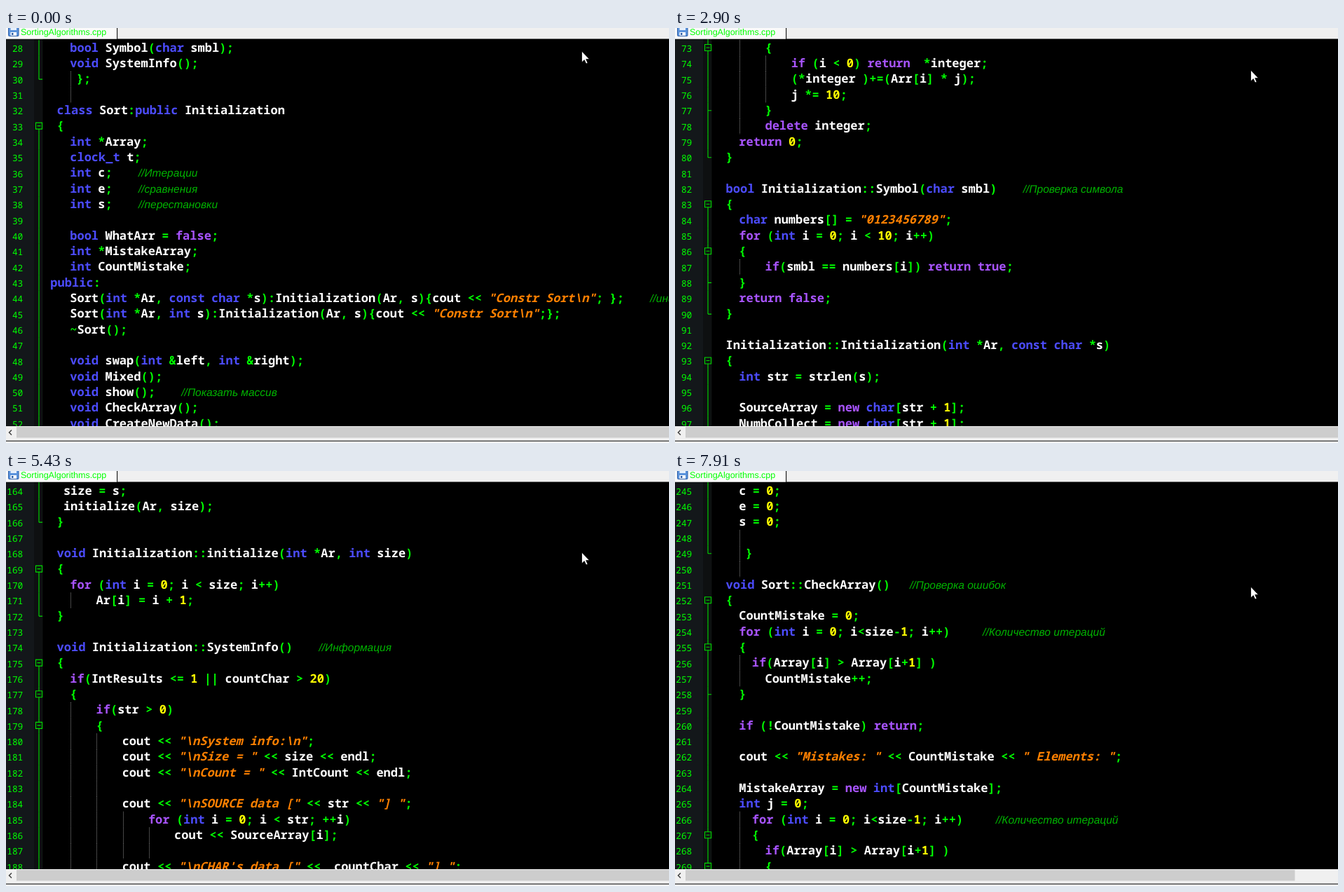
Animation, 946 px wide and 592 px high, one loop 8000 ms. Source, as an HTML page:

```html
<!DOCTYPE html>
<html lang="en">
<head>
<meta charset="utf-8">
<title>Scrolling code</title>
<style>
html, body { margin: 0; width: 100%; height: 100%; overflow: hidden; background: #000; }
svg { display: block; width: 946px; height: 592px; }
text { white-space: pre; text-rendering: geometricPrecision; }
.code text { font: bold 17.05px "Noto Sans Mono", "DejaVu Sans Mono", monospace; fill: #fff; }
.code .type { fill: #4c4cff; }
.code .flow { fill: #a854ff; }
.code .op { fill: #0f0; }
.code .num { fill: #ff0; }
.code .str { fill: #ff8000; font-style: italic; }
.code .chr { fill: #ff0080; font-style: italic; }
.code .note { fill: #00b400; font: italic 15.5px "Liberation Sans", Arial, sans-serif; }
.code .line { fill: #0f0; font: 12.8px "Noto Sans Mono", "DejaVu Sans Mono", monospace; text-anchor: end; }
.guide { stroke: #8a8a8a; stroke-dasharray: 1 1; }
.fold { stroke: #00dc00; stroke-width: 1.1; fill: none; }
.tab { font: 12.5px "Liberation Sans", Arial, sans-serif; fill: #0f0; }
</style>
</head>
<body>
<svg viewBox="0 0 946 592">
  <defs><clipPath id="view"><rect y="16" width="946" height="552"/></clipPath></defs>
  <rect width="946" height="592"/>
  <rect width="40" height="592" fill="#13171a"/>
  <rect x="40" width="12.5" height="592" fill="#0e1011"/>
  <g clip-path="url(#view)"><g class="code" id="code"></g></g>

  <rect width="946" height="15.5" fill="#f0f0f0"/>
  <rect width="158" height="15.5" fill="#fafafa"/>
  <rect x="158" width="1.2" height="16" fill="#222"/>
  <rect x="3.5" y="-3" width="14.5" height="14.5" rx="1" fill="#5b93dc" stroke="#2f5fa8"/>
  <rect x="6.5" y="-3" width="8.5" height="6" fill="#e6f0fc"/>
  <rect x="6.5" y="6" width="8.5" height="5" fill="#fff"/>
  <rect x="8" y="7" width="2.5" height="3" fill="#2f5fa8"/>
  <text class="tab" x="21" y="10">SortingAlgorithms.cpp</text>

  <rect y="568" width="946" height="24" fill="#f0f0f0"/>
  <rect id="thumb" x="15" y="569" width="931" height="15.5" fill="#cdcdcd"/>
  <path d="M8 573.5L4.5 577L8 580.5" fill="none" stroke="#404040" stroke-width="1.5"/>
  <rect y="588.5" width="946" height="1.3" fill="#3a3a3a"/>
  <path id="cursor" d="M0 0V16L3.7 12.6L6.2 18L8.6 17L6.2 11.6H11Z" fill="#fff" stroke="#000" stroke-width=".8"/>
</svg>
<script>
const FIRST = 28, ROW = 22.33, TOP = 17.3, CHAR = 10.23, SPACE = 9.305, LEFT = 54;
const LOOP = 8000;

const cases = (from, to) => Array.from({ length: to - from + 1 }, (_, i) =>
  `           case '${from + i}': IntArrResults[IntCount] = ${from + i}; break;`).join('\n');

// Column 0 holds the fold mark: + opens, - closes an inner block, L closes the outer one.
const source = String.raw`
    bool Symbol(char smbl);
    void SystemInfo();
L    };

  class Sort:public Initialization
+ {
    int *Array;
    clock_t t;
    int c;    //Итерации
    int e;    //сравнения
    int s;    //перестановки

    bool WhatArr = false;
    int *MistakeArray;
    int CountMistake;
 public:
    Sort(int *Ar, const char *s):Initialization(Ar, s){cout << "Constr Sort\n"; };    //инициализация
    Sort(int *Ar, int s):Initialization(Ar, s){cout << "Constr Sort\n";};
    ~Sort();

    void swap(int &left, int &right);
    void Mixed();
    void show();    //Показать массив
    void CheckArray();
    void CreateNewData();

    void SelectionSort();
    void BubbleSort();
    void SumBubbleSort();
    void ShakerSort();
    void InsertSort();
    void ShellSort();
    void downHeap(int k, int s);
    void HeapSort();
    void QuickSort();
    void qsort(int left, int right);
    void QuickSortMod();
    void Counting();
L };

  int Initialization::ToInt(int *Arr, int N)    //Массив в чиисло
+{
      int *integer = new int(0);
      int i = N, j = 1;
        while (i-- >=  0)
+       {
            if (i < 0) return  *integer;
            (*integer )+=(Arr[i] * j);
            j *= 10;
-       }
        delete integer;
    return 0;
L }

  bool Initialization::Symbol(char smbl)    //Проверка символа
+ {
    char numbers[] = "0123456789";
    for (int i = 0; i < 10; i++)
+   {
        if(smbl == numbers[i]) return true;
-   }
    return false;
L }

  Initialization::Initialization(int *Ar, const char *s)
+ {
    int str = strlen(s);

    SourceArray = new char[str + 1];
    NumbCollect = new char[str + 1];
    CharCollect = new char[str + 1];
  countNunb = 0;
  countChar = 0;${' '.repeat(43)}//Счетчик количества букв

    int i = 0;
    while(str != i)${' '.repeat(20)}//Сортировка  символов на буквы и числа в 2 массива в char формате
+   {
        SourceArray[i] = s[i];

        if( Symbol(s[i]) )
+       {
          NumbCollect[countNunb] = s[i];
          countNunb++;
-       }
        else
+       {
          CharCollect[countChar] = s[i];
          countChar++;
-       }
    i++;
-   }
                //Завершаем массивы символов элементом конца строки
    SourceArray[str] = '\0';
    NumbCollect[countNunb] = '\0';
    CharCollect[countChar] = '\0';

    if(str > 25 || countChar > 20 || countNunb > 5)
+   {
      SystemInfo();
-   }

    IntArrResults = new int[countNunb];
    IntCount = 0;
    while(IntCount < countNunb)
+   {
        switch(NumbCollect[IntCount])
+        {
           //Перевод символов в числа

${cases(0, 9)}
-        }
        IntCount++;
-   }
  IntResults = ToInt(IntArrResults, IntCount);

    if(IntResults <= 1 )
+   {
      cout << "\n ! ! ! ERROR ! ! !" ;
      SystemInfo();
-   }

    size = IntResults;
    initialize(Ar, size);
L }

  Initialization::Initialization(int *Ar, int s)
+ {
   size = s;
   initialize(Ar, size);
L }

  void Initialization::initialize(int *Ar, int size)
+ {
    for (int i = 0; i < size; i++)
        Ar[i] = i + 1;
L }

  void Initialization::SystemInfo()    //Информация
+ {
    if(IntResults <= 1 || countChar > 20)
+   {
        if(str > 0)
+       {
            cout << "\nSystem info:\n";
            cout << "\nSize = " << size << endl;
            cout << "\nCount = " << IntCount << endl;

            cout << "\nSOURCE data [" << str << "] ";
                for (int i = 0; i < str; ++i)
                    cout << SourceArray[i];

            cout << "\nCHAR's data [" <<  countChar << "] ";
                for (int i = 0; i < countChar; ++i)
                    cout << CharCollect[i];

            cout << "\nNUMB's data [" << countNunb << "] ";
                for (int i  = 0; i < countNunb; i++)
                    cout << NumbCollect[i];

            if(str > 25 )
+           {
                cout << "\nYou inpput \"" << str << "\" symmbol.  Max 25" <<endl;
                exit(1);
-           }
            else if(countChar > 20)
+           {
                cout << "\nInput data contains \"" << countChar << "\" char simbols.  Max 20" <<endl;
                exit(1);
-           }
            }
+           else if(countNunb > 5 || countNunb <= 1 )
            {
+               if (countNunb > 5)
                {
                    cout << "\nInput data contains \"" << countNunb << "\" numbers.  Max 5" <<endl;
                    exit(1);
-               }
                else
+               {
                    cout << "\nNo numbers in data";
                    exit(1);
-               }
-           }
-       }
-   }
L }

  Sort::~Sort()
+ {
    delete [] Array;
    delete [] MistakeArray;
L }

  void Sort::swap(int &left, int &right)
+ {
    int temp = left;
    left = right;
    right = temp;
    s++;
L }

  void Sort::CreateNewData()
+ {
    for (int i = 0; i < size; i++)
        Array[i] = rand() % size;

    t = 0;
    CountMistake = 0;
    c = 0;
    e = 0;
    s = 0;

L    }

  void Sort::CheckArray()   //Проверка ошибок
+ {
    CountMistake = 0;
    for (int i = 0; i<size-1; i++)     //Количество итераций
+   {
      if(Array[i] > Array[i+1] )
        CountMistake++;
-   }

    if (!CountMistake) return;

    cout << "Mistakes: " << CountMistake << " Elements: ";

    MistakeArray = new int[CountMistake];
    int j = 0;
      for (int i = 0; i<size-1; i++)     //Количество итераций
+     {
        if(Array[i] > Array[i+1] )
+       {`;

const lines = source.split('\n').slice(1);
const $ = id => document.getElementById(id);
const code = $('code');

function add(tag, attrs, text) {
  const el = document.createElementNS('http://www.w3.org/2000/svg', tag);
  for (const k in attrs) el.setAttribute(k, attrs[k]);
  if (text) el.textContent = text;
  code.appendChild(el);
}

const TOKEN = /(?<note>\/\/.*)|(?<str>"(?:\\.|[^"\\])*")|(?<chr>'(?:\\.|[^'\\])*')|(?<num>\d+)|(?<word>\w+)|(?<gap> +)|(?<op>[^\w\s"']+?(?=\/\/|[\w\s"']|$))/g;
const TYPE = /^(bool|void|int|char|const|class|public|clock_t)$/;
const FLOW = /^(while|if|else|for|return|case|switch|break|delete|new|false|true)$/;

function drawCode(line, y) {
  let x = LEFT;
  for (const m of line.matchAll(TOKEN)) {
    const word = m[0];
    let kind = Object.keys(m.groups).find(k => m.groups[k] !== undefined);
    if (kind === 'word') kind = TYPE.test(word) ? 'type' : FLOW.test(word) ? 'flow' : 'word';
    if (kind !== 'gap') add('text', { x, y, class: kind }, word);
    x += word.length * (kind === 'gap' ? SPACE : CHAR);
  }
}

const indentOf = line => line ? line.slice(1).search(/\S/) + 1 : 0;
const indents = lines.map((line, i) => line ? indentOf(line)
  : Math.max(indentOf(lines[i - 1]), indentOf(lines[i + 1])));

let open = true;
lines.forEach((line, i) => {
  const y = TOP + i * ROW, mid = y + ROW / 2, end = y + ROW, mark = line[0];
  add('text', { x: 24.3, y: y + 16.6, class: 'line' }, String(FIRST + i));

  for (let col = 4; col < indents[i]; col += 4) {
    const x = Math.round(LEFT + col * SPACE) + 1.5;
    add('path', { d: `M${x} ${y}V${end}`, class: 'guide' });
  }

  let d = open ? `M47 ${y}V${mark === 'L' ? mid : end}` : '';
  if (mark === '-' || mark === 'L') d += `M47 ${mid}H52`;
  if (mark === '+') {
    d = `M42.5 ${mid - 5}h9v9h-9ZM44.5 ${mid - .5}h5M47 ${mid + 4}V${end}`;
    if (open) d += `M47 ${y}V${mid - 5}`;
    open = true;
  }
  if (mark === 'L') open = false;
  if (d) add('path', { d, class: 'fold' });

  drawCode(' ' + line.slice(1), y + 16.3);
});

// Screen refreshes: [time, equal steps until the next entry].
const refresh = [[0, 1], [150, 4], [690, 1], [960, 6], [1890, 1], [2040, 7], [3050, 1],
  [3200, 3], [3650, 4], [4160, 1], [4310, 3], [4730, 4], [5300, 1], [5430, 5],
  [6160, 2], [6430, 1], [6550, 6], [7460, 1], [7620, 2], [7910, 1], [LOOP, 1]];

// Scroll position: [time, top line].
const path = [[0, 28], [960, 39], [2040, 55], [3650, 100], [4730, 142], [6160, 186], [7910, 245]];

const segment = (list, t) => {
  let i = 0;
  while (i < list.length - 2 && t >= list[i + 1][0]) i++;
  return i;
};

function snap(t) {
  const i = segment(refresh, t), [start, n] = refresh[i];
  const step = (refresh[i + 1][0] - start) / n;
  return start + Math.floor((t - start) / step + 1e-6) * step;
}

function slope(i) {
  const a = path[Math.max(i - 1, 0)], b = path[Math.min(i + 1, path.length - 1)];
  return (b[1] - a[1]) / (b[0] - a[0]);
}

function topLine(t) {
  const i = segment(path, t), [t0, a] = path[i], [t1, b] = path[i + 1];
  const h = t1 - t0, u = Math.min((t - t0) / h, 1), v = 1 - u;
  return Math.round(a * v * v * (1 + 2 * u) + b * u * u * (3 - 2 * u)
    + h * u * v * (slope(i) * v - slope(i + 1) * u));
}

function render(ms) {
  const t = snap(ms), top = topLine(t);
  code.setAttribute('transform', `translate(0 ${-(top - FIRST) * ROW})`);
  $('cursor').setAttribute('transform', `translate(821.5 ${Math.round(33 + (top - FIRST) / 1.64)})`);
  $('thumb').setAttribute('width', t > 6290 ? 869.5 : 931);
}

const began = performance.now();
function tick() {
  render((performance.now() - began) % LOOP);
  requestAnimationFrame(tick);
}
tick();
</script>
</body>
</html>
```
